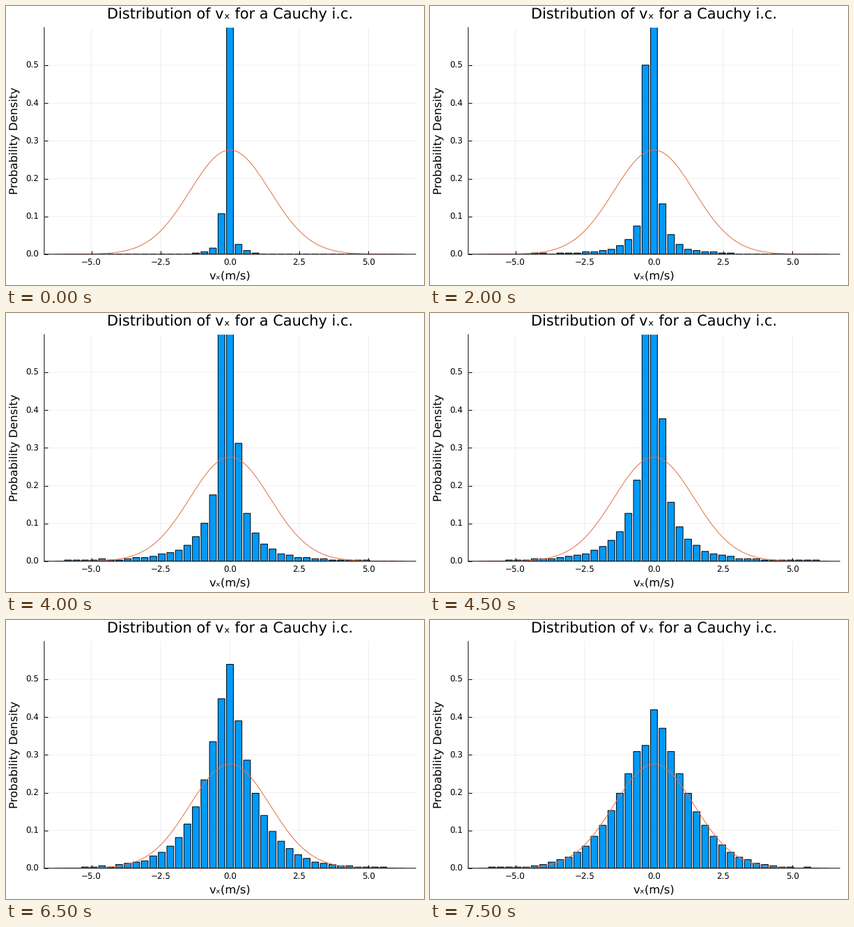
A matplotlib script that plays this animation: 600x400 px, repeating every 8 s.

```python
import matplotlib.pyplot as plt
import numpy as np
from matplotlib.animation import FuncAnimation

W, H, DPI = 600, 400, 100
PX = 72 / DPI                       # one pixel in points
LEFT, RIGHT, TOP, BASE = 54.9, 588.1, 30.8, 355.9
XMAX, YMAX = 6.703, 0.6
STEPS = 16
BINS, REACH, PARTICLES = 39, 6.0, 1000
BIN_W = 2 * REACH / BINS
SIGMA = 1.447
OFFSET = np.arange(BINS) - BINS // 2

plt.rcParams.update({"font.family": "DejaVu Sans", "text.hinting": "none"})


def histogram(step, rng):
    """Particle counts: a heavy-tailed spike that relaxes to a broad bell."""
    u = step / (STEPS - 1)
    k = np.abs(OFFSET)
    power = 0.3 + 1.1 * u ** 4
    rate = 6 * np.exp(-0.08 * step - 2.6 * (power - 0.3))
    level = np.interp(step, [0, 6, 13], [4, 27, 95])
    skew = 0.18 * (1 - u ** 4) * np.sign(OFFSET)
    mean = level * np.exp(-rate * (k ** power - 2 ** power) - skew)

    # The three tallest bars follow their own paths.
    mean[OFFSET == -1] = np.interp(step, [0, 5, 8, 11, 15], [33, 184, 260, 177, 100])
    mean[OFFSET == 0] = np.interp(step, [0, 12, 15], [900, 184, 129])
    mean[OFFSET == 1] = np.interp(step, [0, 6, 9, 11, 15], [8, 57, 116, 125, 114])

    # Random rounding leaves a few single particles in the tails.
    return np.where(k > 1, np.floor(mean + rng.random(BINS)), np.round(mean))


rng = np.random.default_rng(7)
density = [histogram(s, rng) / (PARTICLES * BIN_W) for s in range(STEPS)]

fig = plt.figure(figsize=(W / DPI, H / DPI), dpi=DPI, facecolor="white")
ax = fig.add_axes([LEFT / W, 1 - BASE / H, (RIGHT - LEFT) / W, (BASE - TOP) / H])
ax.set(xlim=(-XMAX, XMAX), ylim=(0, YMAX))
ax.set_axisbelow(True)
ax.spines[["top", "right"]].set_visible(False)
for side in ("left", "bottom"):
    ax.spines[side].set(linewidth=PX, snap=False)

xticks = np.arange(-5, 5.1, 2.5)
yticks = np.arange(6) / 10
ax.set_xticks(xticks)
ax.set_yticks(yticks)
ax.tick_params(direction="in", length=5 * PX, width=PX,
               labelbottom=False, labelleft=False)
ax.grid(color="black", alpha=0.1, linewidth=0.6 * PX)
for line in ax.get_xgridlines() + ax.get_ygridlines():
    line.set_snap(False)


def label(x, y, text, size, ha="center", rotation=0):
    fig.text(x / W, 1 - y / H, text, fontsize=size * PX, ha=ha, va="baseline",
             rotation=rotation, rotation_mode="anchor")


cx, cy = (LEFT + RIGHT) / 2, (TOP + BASE) / 2
label(cx + 0.5, 18.6, "Distribution of vₓ for a Cauchy i.c.", 20.9)
label(cx, 391.8, "vₓ(m/s)", 16.4)
label(17, cy - 0.5, "Probability Density", 16.4, rotation=90)
for x in xticks:
    label(cx + x * (RIGHT - LEFT) / (2 * XMAX), 371.5,
          f"{x:.1f}".replace("-", "\u2212"), 11.9)
for y in yticks:
    label(47.3, BASE - y * (BASE - TOP) / YMAX + 4.3, f"{y:.1f}", 11.9, ha="right")

bars = ax.bar(OFFSET * BIN_W, density[0], width=0.8 * BIN_W, color="#009AF9",
              edgecolor="black", linewidth=PX, snap=False)
v = np.linspace(-6.3, 6.3, 400)
ax.plot(v, np.exp(-v ** 2 / (2 * SIGMA ** 2)) / (SIGMA * np.sqrt(2 * np.pi)),
        color="#E26F46", linewidth=PX)


def draw(step):
    for bar, h in zip(bars, density[step]):
        bar.set_height(h)
    return bars.patches


anim = FuncAnimation(fig, draw, frames=STEPS, interval=500,
                     repeat=True, repeat_delay=0, blit=False)
plt.show()
```
